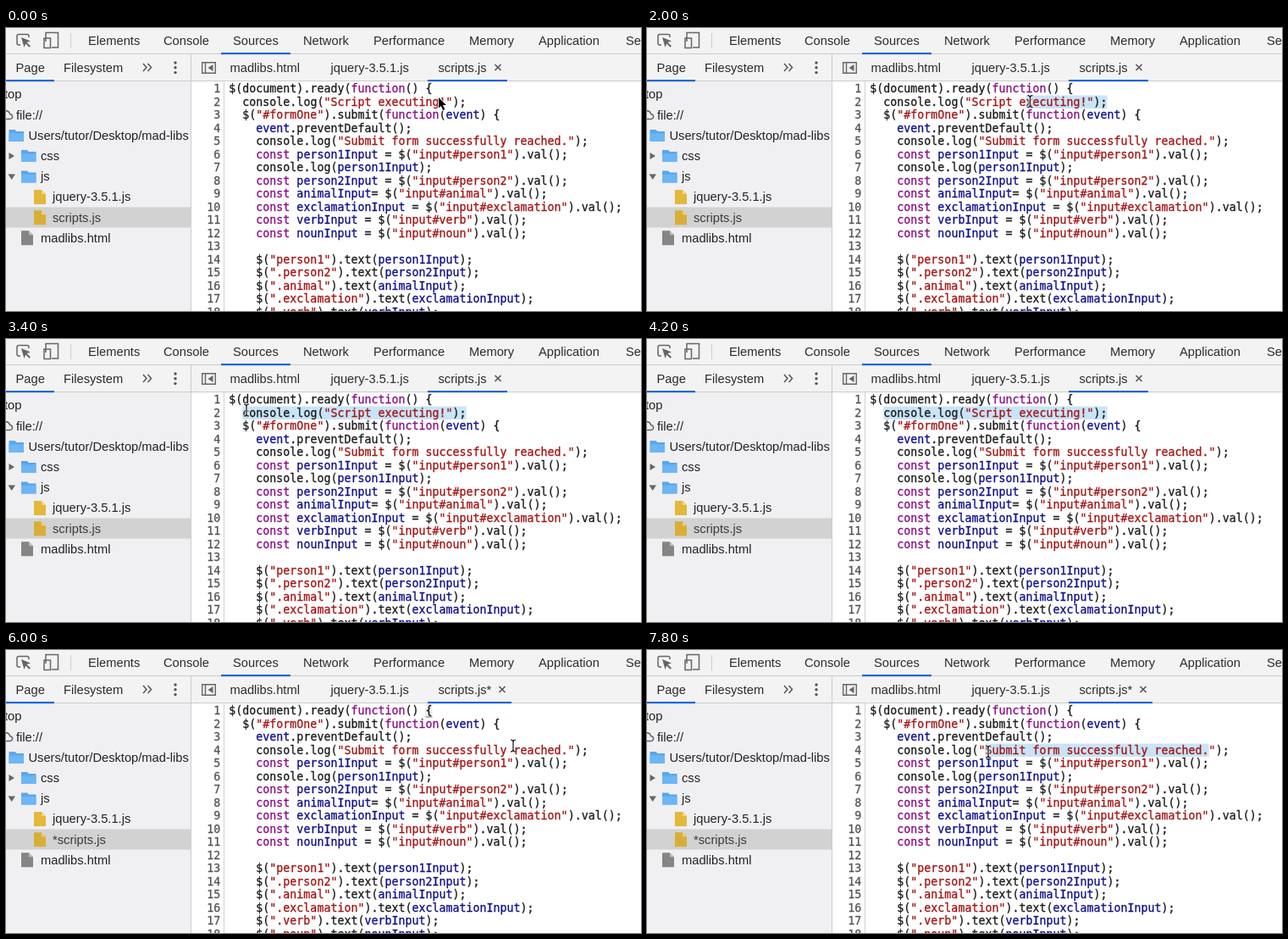
These frames come from a looping animation (750x334 px, 8 s). An HTML page with a canvas:

```html
<!DOCTYPE html>
<html lang="en">
<head>
<meta charset="utf-8">
<title>Editing a script</title>
<style>
html, body { margin: 0; width: 100%; height: 100%; overflow: hidden; background: #fff; }
canvas { display: block; width: 750px; height: 334px; }
</style>
</head>
<body>
<canvas id="stage"></canvas>
<script>
const W = 750, H = 334, LOOP = 8000, STEP = 200;
const canvas = document.getElementById('stage');
const ctx = canvas.getContext('2d');
const ratio = window.devicePixelRatio || 1;
canvas.width = W * ratio;
canvas.height = H * ratio;

const UI = '14.7px "Liberation Sans", Arial, sans-serif';
const MONO = '13.3px "DejaVu Sans Mono", monospace';
const CODE_X = 263.3, CODE_Y = 64, CHAR = 8.007, ROW = 15.5;
const BLUE = '#1a66d6', BAR = '#f3f3f3', EDGE = '#cccccc', GREY = '#666';

const CODE = `$(document).ready(function() {
  console.log("Script executing!");
  $("#formOne").submit(function(event) {
    event.preventDefault();
    console.log("Submit form successfully reached.");
    const person1Input = $("input#person1").val();
    console.log(person1Input);
    const person2Input = $("input#person2").val();
    const animalInput= $("input#animal").val();
    const exclamationInput = $("input#exclamation").val();
    const verbInput = $("input#verb").val();
    const nounInput = $("input#noun").val();

    $("person1").text(person1Input);
    $(".person2").text(person2Input);
    $(".animal").text(animalInput);
    $(".exclamation").text(exclamationInput);
    $(".verb").text(verbInput);
    $(".noun").text(nounInput);`.split('\n');

// Key times of the edit
const DRAG1 = 1600, HIDE = 3600, CLEAR = 4600, OUTDENT = 5000, JOIN = 5400;
const SHOW = 5800, DRAG2 = 6600;

// Pointer paths: [time, x, y]
const ARROW = [[0, 511, 82], [1000, 554, 89], [1400, 554, 89]];
const BEAM1 = [[1400, 552, 89], [DRAG1, 544, 88], [2600, 284, 84]];
const BEAM2 = [[SHOW, 585, 108], [6000, 599, 113], [DRAG2, 664, 119], [7600, 403, 120]];

const colX = col => CODE_X + col * CHAR;
const rowY = row => CODE_Y + row * ROW;

function rect(x, y, w, h, color) {
  ctx.fillStyle = color;
  ctx.fillRect(x, y, w, h);
}

function text(str, x, y, color = '#2b2b2b', font = UI, align = 'left') {
  ctx.font = font;
  ctx.fillStyle = color;
  ctx.textAlign = align;
  ctx.fillText(str, x, y);
}

// Code is set slightly heavier than the plain face
function mono(str, x, y, color, align) {
  text(str, x, y, color, MONO, align);
  ctx.strokeStyle = color;
  ctx.lineWidth = 0.3;
  ctx.strokeText(str, x, y);
}

function poly(points, color) {
  ctx.beginPath();
  points.forEach(([x, y]) => ctx.lineTo(x, y));
  ctx.closePath();
  ctx.fillStyle = color;
  ctx.fill();
}

function stroke(d, color = GREY, width = 1.5) {
  ctx.strokeStyle = color;
  ctx.lineWidth = width;
  ctx.stroke(new Path2D(d));
}

function along(path, t) {
  if (t <= path[0][0]) return path[0].slice(1);
  for (let i = 1; i < path.length; i++) {
    const [t0, x0, y0] = path[i - 1], [t1, x1, y1] = path[i];
    if (t <= t1) {
      const u = (t - t0) / (t1 - t0), k = u * u * (3 - 2 * u);
      return [x0 + (x1 - x0) * k, y0 + (y1 - y0) * k];
    }
  }
  return path[path.length - 1].slice(1);
}

function drawToolbar() {
  rect(0, 0, W, 30, BAR);
  rect(0, 30, W, 1, EDGE);
  stroke('M17 20H15Q13 20 13 18V9.5Q13 7.5 15 7.5H25Q27 7.5 27 9.5V11');
  poly([[18, 11], [29, 15.5], [24.5, 17], [29, 21.3], [27.5, 22.8], [23.2, 18.5], [21.5, 23]], GREY);
  stroke('M47 16V5.5H61.5V23H54');
  stroke('M45 12H52.5V23.5H45Z');
  rect(76, 6, 1, 18, EDGE);
  const tabs = [['Elements', 97], ['Console', 186], ['Sources', 268], ['Network', 351],
    ['Performance', 434], ['Memory', 547], ['Application', 629], ['Security', 732]];
  tabs.forEach(([name, x]) => text(name, x, 19.7));
}

function drawTabs(dirty) {
  rect(0, 31, W, 31, BAR);
  rect(0, 62, W, 1, EDGE);
  text('Page', 11.5, 51.7);
  text('Filesystem', 68, 51.7);
  stroke('M162 42L166 46.5L162 51M167.5 42L171.5 46.5L167.5 51', '#555');
  for (const y of [41, 46.8, 52.6]) {
    ctx.beginPath();
    ctx.arc(200, y, 1.7, 0, Math.PI * 2);
    ctx.fillStyle = '#555';
    ctx.fill();
  }
  stroke('M231.7 40.7H247.3V53.3H231.7ZM235.5 40.7V53.3', GREY, 1.4);
  poly([[244.5, 43], [244.5, 51], [238.5, 47]], GREY);
  text('madlibs.html', 264.5, 51.7);
  text('jquery-3.5.1.js', 383.5, 51.7);
  text('scripts.js' + (dirty ? '*' : ''), 510.5, 51.7);
  const x = dirty ? 586 : 581;
  stroke(`M${x - 3.5} 43l7 7m0 -7l-7 7`, '#555', 1.6);
  underline(254, 336, 29);
  underline(0, 57, 61);
  underline(498, x + 11, 61);
}

function underline(from, to, y) {
  rect(from, y, to - from, 2.2, BLUE);
}

function folder(x, y) {
  poly([[x, y - 7], [x + 7, y - 7], [x + 9, y - 5], [x + 17.5, y - 5],
    [x + 17.5, y + 7], [x, y + 7]], '#5aa7ea');
  rect(x, y - 2.6, 17.5, 9.6, '#6cb6f5');
}

function page(x, y, color, fold) {
  poly([[x, y - 8.5], [x + 9, y - 8.5], [x + 14, y - 3.5], [x + 14, y + 8.5], [x, y + 8.5]], color);
  poly([[x + 9, y - 8.5], [x + 14, y - 3.5], [x + 9, y - 3.5]], fold);
}

function drawTree(dirty) {
  rect(0, 63, 218, H - 63, '#f0eff2');
  rect(0, 211.5, 218, 24, '#d2d2d3');
  text('top', -2, 83, '#222');
  stroke('M-2 107.5H4.5Q8 107 7.5 104Q7 101.5 4.5 101.5Q4 97.5 -2 97.5', GREY, 1.5);
  text('file://', 12, 107.5, '#222');
  folder(3.5, 127);
  text('Users/tutor/Desktop/mad-libs', 26.5, 132, '#222');
  poly([[3.5, 147], [3.5, 155], [10, 151]], GREY);
  folder(18, 151);
  text('css', 41, 156, '#222');
  poly([[2.5, 172.5], [11, 172.5], [6.7, 179]], GREY);
  folder(18, 175.5);
  text('js', 41, 180.3, '#222');
  page(33, 199.5, '#e2b93b', '#f0d683');
  text('jquery-3.5.1.js', 55, 204.3, '#222');
  page(33, 223.7, '#d7af38', '#ead07d');
  text((dirty ? '*' : '') + 'scripts.js', 55, 228.5, '#3a3a3a');
  page(18, 247.7, '#858585', '#bdbdbd');
  text('madlibs.html', 41, 252.5, '#222');
  rect(218, 31, 1, H - 31, EDGE);
}

function tokenColor(token) {
  if (token[0] === '"') return '#a31515';
  if (token === 'const' || token === 'function') return '#8a0f86';
  if (/^(\w+Input|event)$/.test(token)) return '#10108a';
  return '#1c1c1c';
}

function drawCode(lines) {
  lines.slice(0, 18).forEach((line, row) => {
    const y = rowY(row) + 12.4;
    mono(row + 1, 253.3, y, '#555', 'right');
    for (const m of line.matchAll(/"[^"]*"|[\w$]+|[^\w$"\s]+/g)) {
      mono(m[0], colX(m.index), y, tokenColor(m[0]), 'left');
    }
  });
}

function select(row, from, to) {
  rect(colX(from), rowY(row), (to - from) * CHAR, ROW, '#c8e4f8');
}

function drag(row, first, last, x) {
  const col = Math.floor((x - CODE_X) / CHAR);
  select(row, Math.max(first, Math.min(last, col)), last);
}

// Blinks from the moment of the last edit
function caret(row, col, age) {
  if (age % 1000 < 500) rect(colX(col) - 0.2, rowY(row) + 0.5, 1.2, ROW - 1, '#111');
}

function arrow([x, y]) {
  const shape = `M${x} ${y}v12.5l2.8 -2.6l2.3 5l2.2 -1l-2.3 -4.9h4Z`;
  ctx.lineJoin = 'round';
  stroke(shape, '#fff', 1.6);
  ctx.fillStyle = '#000';
  ctx.fill(new Path2D(shape));
  ctx.lineJoin = 'miter';
}

function beam([x, y]) {
  const shape = `M${x - 3} ${y - 7}q3 0 3 2.5v9q0 2.5 -3 2.5m6 -14q-3 0 -3 2.5m0 9q0 2.5 3 2.5`;
  stroke(shape, 'rgba(255,255,255,.8)', 3);
  stroke(shape, '#111', 1.2);
}

function draw(t) {
  const dirty = t >= CLEAR, joined = t >= JOIN;
  const lines = CODE.slice();
  if (joined) lines.splice(1, 1);
  else if (dirty) lines[1] = '';

  ctx.setTransform(ratio, 0, 0, ratio, 0, 0);
  rect(0, 0, W, H, '#fff');
  rect(257, 63, 1, H - 63, '#d0d0d0');

  if (t >= DRAG1 && !dirty) drag(1, 2, 35, along(BEAM1, t)[0]);
  if (t >= DRAG2) drag(3, 17, 50, along(BEAM2, t)[0]);
  if (joined && t < DRAG2) {
    rect(colX(29), rowY(0), CHAR, ROW, '#ececec');
    rect(colX(29), rowY(0) + ROW - 1, CHAR, 1, '#777');
    caret(0, 30, t - JOIN);
  } else if (dirty && !joined) {
    if (t < OUTDENT) caret(1, 2, t - CLEAR);
    else caret(1, 0, t - OUTDENT);
  }
  drawCode(lines);

  drawToolbar();
  drawTree(dirty);
  drawTabs(dirty);
  rect(218, 31, 1, 31, EDGE);

  if (t < 1400) arrow(along(ARROW, t));
  else if (t < HIDE) beam(along(BEAM1, t));
  else if (t >= SHOW) beam(along(BEAM2, t));
}

function tick() {
  const t = performance.now() % LOOP;
  draw(Math.floor(t / STEP) * STEP);
  requestAnimationFrame(tick);
}
tick();
</script>
</body>
</html>
```
